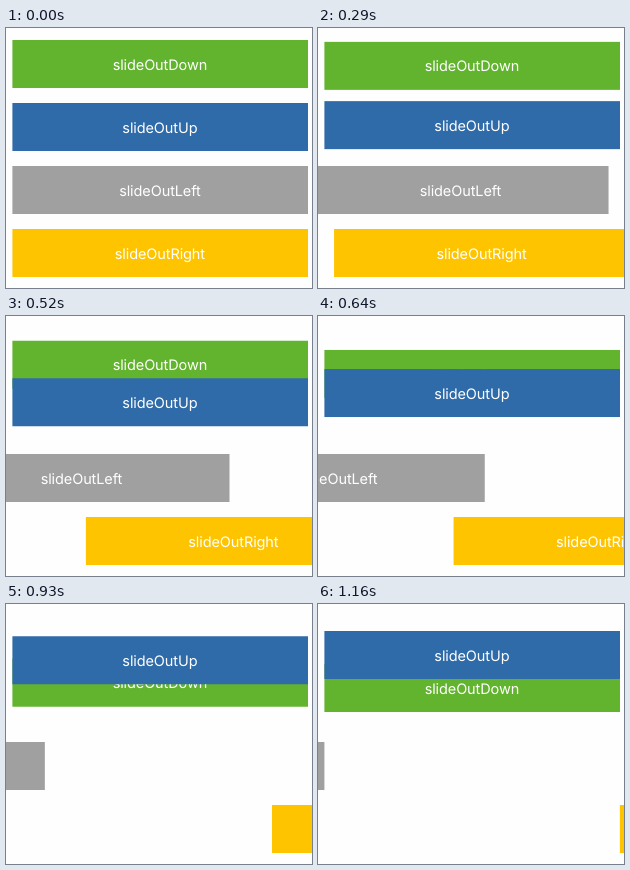
Animation, 306 px wide and 260 px high, one loop 1800 ms. Source, as an HTML page:

```html
<!DOCTYPE html>
<html lang="en">
<head>
<meta charset="utf-8">
<title>Slide out</title>
<style>
  html, body { margin: 0; width: 100%; height: 100%; overflow: hidden; background: #fefefe; }
  svg { display: block; }
  text {
    fill: #fff; text-anchor: middle; text-rendering: geometricPrecision;
    font: 400 14.5px Inter, Roboto, sans-serif; letter-spacing: -0.1px;
  }
</style>
</head>
<body>
<svg id="stage" width="306" height="260" viewBox="0 0 306 260"></svg>
<script>
  const LOOP = 1800, START = 162, DURATION = 1000;
  const FIRST = 170, LAST_STEP = 17;
  const LEFT = 6.4, W = 295.6, H = 48, TOP = 12, PITCH = 63;

  function add(parent, tag, attrs) {
    const el = document.createElementNS('http://www.w3.org/2000/svg', tag);
    for (const name in attrs) el.setAttribute(name, attrs[name]);
    return parent.appendChild(el);
  }

  const bars = [
    { label: 'slideOutDown', color: '#62b42e', dx: 0, dy: 1, delay: 0 },
    { label: 'slideOutUp', color: '#2f6ba9', dx: 0, dy: -1, delay: 0 },
    { label: 'slideOutLeft', color: '#a0a0a0', dx: -1, dy: 0, delay: 0 },
    { label: 'slideOutRight', color: '#ffc400', dx: 1, dy: 0, delay: 12 }
  ];

  const stage = document.getElementById('stage');
  bars.forEach((bar, i) => {
    const y = TOP + i * PITCH;
    bar.el = add(stage, 'g', {});
    add(bar.el, 'rect', { x: LEFT, y, width: W, height: H, fill: bar.color });
    add(bar.el, 'text', { x: LEFT + W / 2 - 0.3, y: y + 29.6 }).textContent = bar.label;
  });

  function bezier(x1, y1, x2, y2) {
    const at = (a, b, s) => 3 * (1 - s) * s * ((1 - s) * a + s * b) + s ** 3;
    return x => {
      let lo = 0, hi = 1;
      for (let i = 0; i < 24; i++) {
        const s = (lo + hi) / 2;
        if (at(x1, x2, s) < x) lo = s;
        else hi = s;
      }
      return at(y1, y2, lo);
    };
  }
  const ease = bezier(0.45, 0.04, 0.58, 1);

  // The picture moves in steps of about 58 ms, on whole hundredths of a second.
  const stepTime = k => FIRST + 10 * Math.round(5.8 * k + 0.2);

  function held(t) {
    if (t < FIRST) return 0;
    let k = LAST_STEP;
    while (k > 0 && stepTime(k) > t) k--;
    return stepTime(k);
  }

  function draw(t) {
    const now = held(t);
    for (const { el, dx, dy, delay } of bars) {
      const x = (now - START - delay) / DURATION;
      const p = ease(Math.min(1, Math.max(0, x)));
      el.setAttribute('transform', `translate(${dx * W * p} ${dy * H * p})`);
    }
  }

  const start = performance.now();
  function frame() {
    draw((performance.now() - start) % LOOP);
    requestAnimationFrame(frame);
  }
  frame();
</script>
</body>
</html>
```
